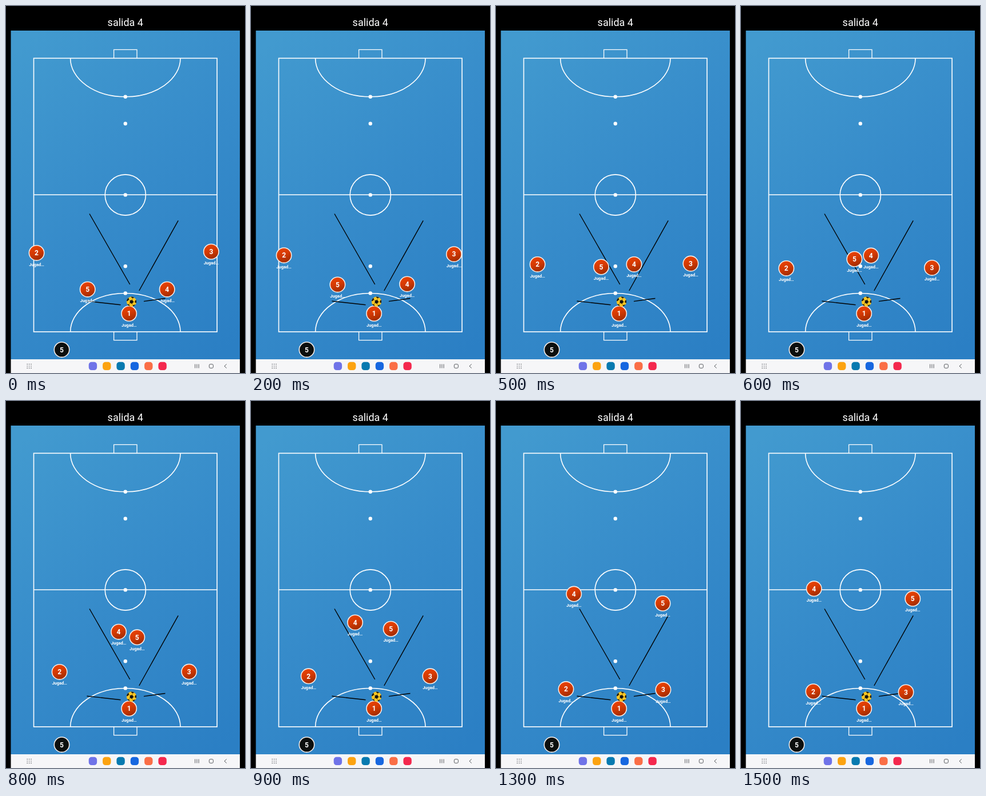
An HTML page for the animation above (1.6 s loop, 418 px wide and 642 px high).

```html
<!DOCTYPE html>
<html lang="es">
<head>
<meta charset="utf-8">
<title>salida 4</title>
<style>
  html, body { margin: 0; width: 100%; height: 100%; overflow: hidden; background: #000; }
  svg { display: block; width: 418px; height: 642px; }
  text { font-family: Roboto, sans-serif; fill: #fff; text-anchor: middle; }
  .num { font-size: 12px; font-weight: 700; }
  .label { font-size: 7.5px; font-weight: 700; }
</style>
</head>
<body>
<svg viewBox="0 0 418 642">
  <defs>
    <linearGradient id="floor" gradientUnits="userSpaceOnUse" x1="0" y1="90" x2="400" y2="590">
      <stop offset="0" stop-color="#429acf"/>
      <stop offset=".5" stop-color="#368bca"/>
      <stop offset="1" stop-color="#2b7fc4"/>
    </linearGradient>
    <linearGradient id="red" x1=".3" y1="0" x2=".7" y2="1">
      <stop offset="0" stop-color="#ea4304"/>
      <stop offset=".45" stop-color="#d53a02"/>
      <stop offset="1" stop-color="#9c2b02"/>
    </linearGradient>
    <clipPath id="ballClip"><circle r="8.6"/></clipPath>
  </defs>
  <rect width="418" height="642" fill="#000"/>
  <text x="208.8" y="34.6" font-size="18">salida 4</text>
  <rect x="8.5" y="43" width="400.5" height="575" fill="url(#floor)"/>

  <g fill="none" stroke="#fff" stroke-width="1.6">
    <rect x="48.5" y="91.4" width="320.6" height="478.5"/>
    <path d="M48.5 330.3H369.1"/>
    <circle cx="208.8" cy="330.5" r="35.6"/>
    <path d="M112.6 91.4A96.2 67.4 0 0 0 305 91.4M112.6 569.9A96.2 67.4 0 0 1 305 569.9"/>
    <path d="M188.6 91.4V76.3H229V91.4M188.6 569.9V584.6H229V569.9" stroke-width="1.3"/>
  </g>
  <g id="spots" fill="#fff"></g>

  <path d="M146 363.5L216.7 487M301.2 375.3L232.8 498M141.5 516.2L200.5 522.7M241 516.6L278.5 511.5"
        fill="none" stroke="#000" stroke-width="1.4"/>

  <g id="players"></g>

  <g transform="translate(219.5 517.2)">
    <circle r="8.6" fill="#f9c623"/>
    <g clip-path="url(#ballClip)" fill="#161410">
      <path d="M-2.6 -2.2L1.6 -3L3.6 .6L.8 3.8L-3 2Z"/>
      <path d="M-9 -5L-5 -6.5L-4.4 -3.4L-7 -1L-9 -1Z"/>
      <path d="M-1.5 -9L5 -9L4.6 -6.6L1 -6.2Z"/>
      <path d="M9 -3.5L6.4 -2L6.2 1.6L9 3Z"/>
      <path d="M2.6 6.4L6 5L7 9L2 9Z"/>
      <path d="M-7 4L-4 5.4L-3 9L-7 9Z"/>
      <path d="M.8 -3L2.4 -6.4M3.6 .6L6.3 0M.8 3.8L3 6.6M-3 2L-4.6 5.6M-2.6 -2.2L-5 -4"
            stroke="#5c4812" stroke-width=".6"/>
    </g>
  </g>

  <rect x="8.5" y="618" width="400.5" height="24" fill="#f6f6f8"/>
  <g id="apps"></g>
  <g id="dots" fill="#63666b"></g>
  <g fill="none" stroke="#55585c" stroke-width="1">
    <path d="M330.7 626.5V633.5M333.9 626.5V633.5M337.1 626.5V633.5"/>
    <rect x="355.4" y="626.6" width="7" height="6.8" rx="2"/>
    <path d="M385.8 626.5L382 630L385.8 633.5"/>
  </g>
</svg>
<script>
const LOOP = 1600, STEP = 100;

function add(parent, tag, attrs, text) {
  const el = document.createElementNS("http://www.w3.org/2000/svg", tag);
  for (const key in attrs) el.setAttribute(key, attrs[key]);
  if (text) el.textContent = text;
  parent.appendChild(el);
  return el;
}
const group = id => document.getElementById(id);

for (const y of [158.8, 205.8, 330.4, 455.2, 502.4])
  add(group("spots"), "circle", { cx: 208.8, cy: y, r: 3.2 });

["#6f73e8", "#fca311", "#087ab0", "#1767e0", "#fa6e46", "#f4284e"].forEach((fill, i) =>
  add(group("apps"), "rect", { x: 144.7 + i * 24.35, y: 622.7, width: 14.4, height: 14.4, rx: 5, fill }));

for (let i = 0; i < 9; i++)
  add(group("dots"), "circle", { cx: 37.2 + i % 3 * 3.4, cy: 626.6 + Math.floor(i / 3) * 3.4, r: .8 });

// number, start, end
const players = [
  [1, [215.2, 538], [215.2, 538]],
  [2, [53.4, 431.8], [126.6, 508.4]],
  [3, [359, 429.6], [288.4, 509.6]],
  [5, [142.4, 496], [300.6, 345.5]],
  [4, [282, 496], [127.4, 328]]
].map(([num, from, to]) => ({ from, to, el: makePlayer(num, "url(#red)", true) }));

function makePlayer(num, fill, named) {
  const g = add(group("players"), "g", {});
  add(g, "circle", { r: 13.2, fill, stroke: "#f4ece8", "stroke-width": 1.6 });
  add(g, "text", { class: "num", y: 4.3 }, String(num));
  if (named) add(g, "text", { class: "label", y: 22.6 }, "Jugad…");
  return g;
}

function place(el, x, y) {
  el.setAttribute("transform", `translate(${x.toFixed(2)} ${y.toFixed(2)})`);
}

place(makePlayer(5, "#0c0f0e", false), 97.5, 601.2);

function draw(ms) {
  const t = Math.floor(ms % LOOP / STEP) * STEP;
  const p = Math.min(1, 0.0275 + t * 0.00063);
  const k = (1 - Math.cos(Math.PI * p)) / 2;
  for (const { from, to, el } of players)
    place(el, from[0] + (to[0] - from[0]) * k, from[1] + (to[1] - from[1]) * k);
}

let start;
function tick(now) {
  if (start === undefined) start = now;
  draw(Math.max(0, now - start));
  requestAnimationFrame(tick);
}
draw(0);
requestAnimationFrame(tick);
</script>
</body>
</html>
```
